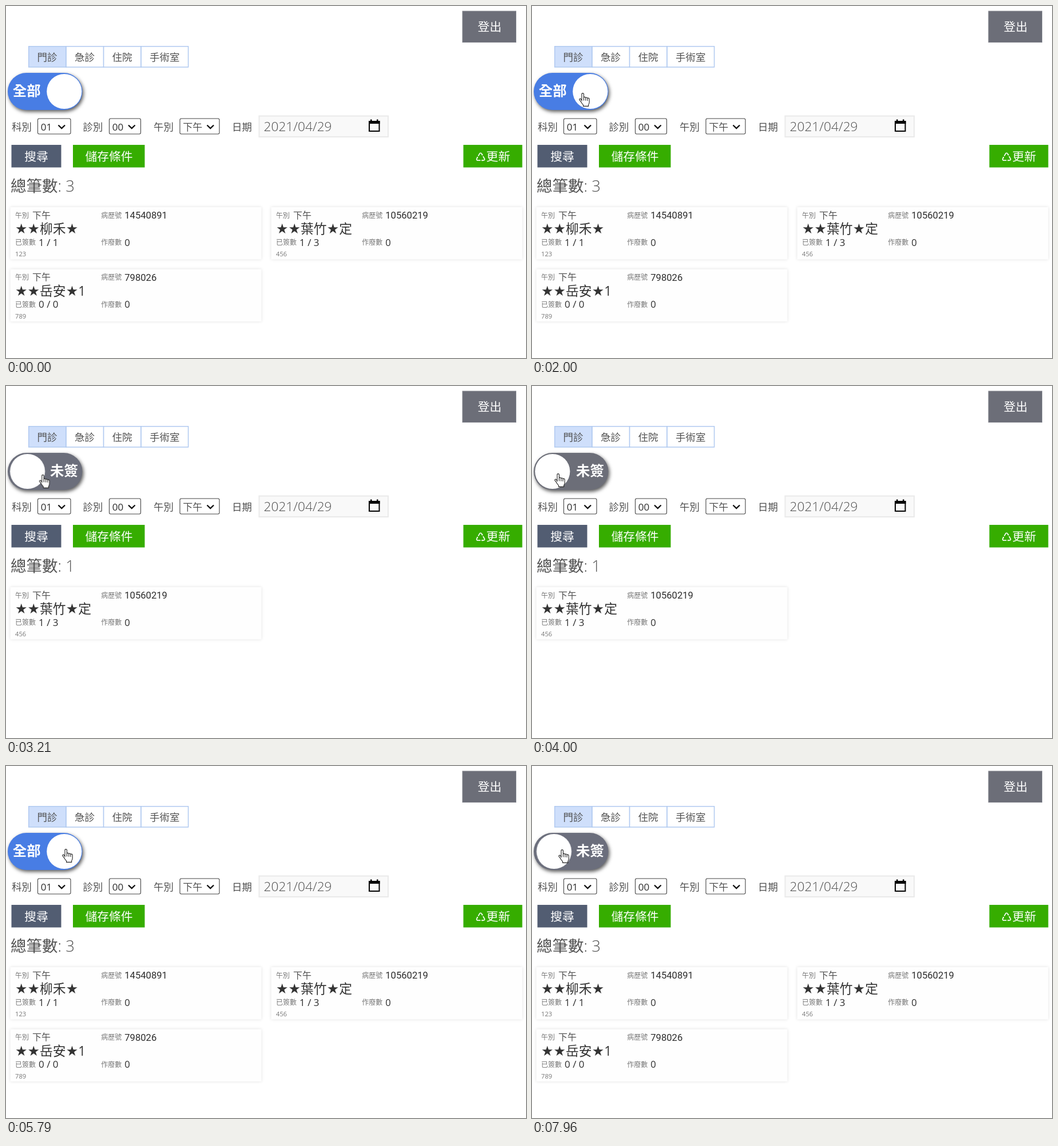
Animation, 909 px wide and 616 px high, one loop 8 s. Source, as an HTML page:

```html
<!DOCTYPE html>
<html lang="zh-Hant">
<head>
<meta charset="utf-8">
<title>門診清單</title>
<style>
html, body { margin: 0; width: 100%; height: 100%; overflow: hidden; background: #fff; }
svg { display: block; width: 909px; height: 616px; }
text { font-family: "Open Sans", "Noto Sans CJK TC", "Noto Sans CJK JP", sans-serif; font-weight: 300; fill: #505050; white-space: pre; }
.white { fill: #fff; }
.bold { font-weight: 700; }
.name { font-weight: 500; fill: #333; }
.dark { font-weight: 400; fill: #2c2c2c; }
.small { fill: #777; }
.num { font-family: Roboto, sans-serif; }
.sym { font-family: "DejaVu Sans", sans-serif; font-weight: 400; }
.card { fill: #fefefe; filter: drop-shadow(0 0 2.5px rgba(0, 0, 0, .12)); }
#track { fill: #487de4; filter: drop-shadow(2px 3px 3px rgba(0, 0, 0, .65)); }
</style>
</head>
<body>
<svg id="stage" viewBox="0 0 909 616">
  <g id="page"></g>
  <g id="toggle">
    <rect id="track" x="3" y="117" width="130.5" height="65" rx="32.5"/>
    <text class="white bold" x="11.8" y="157.3" font-size="24.4">全部</text>
    <text class="white bold" x="77" y="157.3" font-size="24.4">未簽</text>
    <circle id="knob" cx="101.8" cy="149.5" r="30.6" fill="#fff"/>
  </g>
  <g id="all"></g>
  <g id="unsigned"></g>
  <g id="cursor" stroke-linejoin="round" stroke-linecap="round">
    <path id="arrow" fill="#fff" stroke="#222" stroke-width="1.1" d="M.5.5V17.5L4.6 13.8 7.4 20.4 10 19.3 7.2 12.8H12.8Z"/>
    <path id="hand" fill="#fff" stroke="#222" stroke-width="1.1" d="M-2 14V2.2Q-2 .6-.3.6T1.5 2.2V8.5Q1.8 7 3.3 7.2T4.8 9Q5.2 7.7 6.6 8T8 9.8Q8.5 8.7 9.8 9.1T11.2 11V16.5Q11 19 9.7 20.5V23.4H.6V21.2Q-2.2 18.2-4 14.8L-6 12.2Q-6.5 10.8-5.2 10.3T-3.2 11.4L-2 13.2M1.5 8.5V13M4.8 9V13.2M8 9.8V13.4"/>
    <path id="beam" fill="none" stroke="#222" stroke-width="1.4" d="M-4.5-9H-1.5Q0-9 0-7.5 0-9 1.5-9H4.5M0-7.5V7.5M-4.5 9H-1.5Q0 9 0 7.5 0 9 1.5 9H4.5"/>
  </g>
</svg>
<script>
const LOOP = 8000;
const $ = id => document.getElementById(id);

const text = (x, y, size, str, cls = '') =>
  `<text x="${x}" y="${y}" font-size="${size}" class="${cls}">${str}</text>`;
const rect = (x, y, w, h, attrs) =>
  `<rect x="${x}" y="${y}" width="${w}" height="${h}" ${attrs}/>`;

const button = (x, y, w, h, fill, textX, baseline, label) =>
  rect(x, y, w, h, `fill="${fill}"`) + text(textX, baseline, 20.8, label, 'white');

const tab = (x, w, label, fill = '#fff') =>
  rect(x, 70.7, w, 36.2, `fill="${fill}" stroke="#b0c9f0" stroke-width="1.5"`) +
  text(x + 14.8, 95.5, 17.5, label);

const select = (x, w, value, cls = 'dark') =>
  rect(x, 197, w, 27, 'rx="2.5" fill="#fff" stroke="#444" stroke-width="1.1"') +
  text(x + 5.2, 217.8, 17, value, cls) +
  `<path d="M${x + w - 21.5} 208.5l5.8 5.6 5.8-5.6" fill="none" stroke="#111" stroke-width="2.3"/>`;

$('page').innerHTML = [
  rect(798, 9, 93.5, 54.5, 'fill="#6c6e78" stroke="#83858e"'),
  text(824.6, 43.7, 20.8, '登出', 'white'),
  tab(39.7, 65.4, '門診', '#cfdffb'),
  tab(105.1, 65.5, '急診'),
  tab(170.6, 65.5, '住院'),
  tab(236.1, 82.5, '手術室'),
  text(10, 217.8, 17.4, '科別'), select(55.5, 57.5, '01'),
  text(134.5, 217.8, 17.4, '診別'), select(180.5, 55, '00'),
  text(258, 217.8, 17.4, '午別'), select(304, 69, '下午', ''),
  text(395, 217.8, 17.4, '日期'),
  rect(442.5, 192.5, 225.5, 36.5, 'fill="#f9f9f9" stroke="#eaeaea" stroke-width="2"'),
  text(450.5, 219.3, 22.7, '2021/04/29'),
  '<path d="M635 202h17.5v17H635z" fill="none" stroke="#000" stroke-width="2"/>',
  '<path d="M634 201h19.5v5H634zM637 198.5h2.5v3H637zM648 198.5h2.5v3H648z"/>',
  button(9.5, 243, 87, 39.5, '#525d72', 32.3, 271.3, '搜尋'),
  button(117, 243, 125.5, 39.5, '#36ad00', 138.4, 271.3, '儲存條件'),
  button(799.5, 243, 103, 39.5, '#36ad00', 839.6, 271.3, '更新'),
  text(820.2, 271.5, 21, '♺', 'sym white'),
].join('');

const withStars = s => s.replace(/★+/g, '<tspan class="sym" font-size="24">$&</tspan>');

const card = (x, y, p) => `<g transform="translate(${x} ${y})">` +
  rect(7.5, 352, 439, 91.5, 'class="card"') +
  text(16, 370.5, 12, '午別', 'small') + text(46, 371.8, 16, '下午') +
  text(166.3, 370.5, 12, '病歷號', 'small') + text(207.3, 372, 16.6, p.id, 'num dark') +
  text(16, 398.3, 22.8, withStars(p.name), 'name') +
  text(16, 418, 12, '已簽數', 'small') + text(57, 419.5, 17, p.signed, 'dark') +
  text(166.3, 418, 12, '作廢數', 'small') + text(207.3, 419.5, 16.6, '0', 'dark') +
  text(16, 438.3, 11.2, p.note, 'dark small') + '</g>';

const patients = [
  { id: '14540891', name: '★★柳禾★', signed: '1 / 1', note: '123' },
  { id: '10560219', name: '★★葉竹★定', signed: '1 / 3', note: '456' },
  { id: '798026', name: '★★岳安★1', signed: '0 / 0', note: '789' },
];
const list = people => text(8, 325.3, 27.5, `總筆數: ${people.length}`) +
  people.map((p, i) => card(i % 2 * 456, (i >> 1) * 108.5, p)).join('');
$('all').innerHTML = list(patients);
$('unsigned').innerHTML = list([patients[1]]);

// steps: [ms, value, easing until the next step]
function play(el, prop, steps, fallback) {
  const last = steps[steps.length - 1];
  const full = last[0] < LOOP ? [...steps, [LOOP, last[1]]] : steps;
  el.animate(full.map(([ms, value, easing = fallback]) =>
    ({ offset: ms / LOOP, [prop]: value, easing })),
    { duration: LOOP, iterations: Infinity });
}
const HOLD = 'steps(1, end)';
const show = (id, steps) => play($(id), 'opacity', steps, HOLD);

// Toggle: each slide lasts 400 ms
const slides = [2895, 4670, 6880];
function slide(el, prop, on, off, cut) {
  const steps = [[0, on, HOLD]];
  slides.forEach((ms, i) => {
    const [from, to] = i % 2 ? [off, on] : [on, off];
    steps.push([ms, from, 'ease'], [ms + 400, to, HOLD]);
  });
  // the last slide is cut short by the end of the loop
  steps.push([7935, off, 'linear'], [LOOP, cut]);
  play(el, prop, steps, HOLD);
}
slide($('knob'), 'transform', 'translateX(0px)', 'translateX(-66px)', 'translateX(-59.4px)');
slide($('track'), 'fill', '#487de4', '#6c6e78', '#696f81');

show('all', [[0, 1], [2880, 0], [4670, 1], [6880, 0], [7920, 1]]);
show('unsigned', [[0, 0], [2880, 1], [4670, 0], [6880, 1], [7920, 0]]);

show('arrow', [[0, 0], [90, 1], [1340, 0], [2340, 1], [2790, 0]]);
show('beam', [[0, 0], [2790, 1], [3000, 0]]);
show('hand', [[0, 0], [1340, 1], [2340, 0], [3000, 1]]);

const at = (ms, x, y, easing) => [ms, `translate(${x}px, ${y}px)`, easing];
play($('cursor'), 'transform', [
  at(0, 175, 81, HOLD), at(130, 76, 190, HOLD), at(580, 76, 190),
  at(1000, 70, 153), at(1250, 89, 152, HOLD),
  at(2750, 89, 152), at(2880, 85, 157, HOLD),
  at(2960, 85, 157), at(3450, 46, 153, HOLD),
  at(4460, 46, 153), at(4660, 66, 161, HOLD),
  at(5670, 66, 161), at(5790, 105, 145, HOLD),
  at(6420, 105, 145), at(6840, 53, 146, HOLD),
], 'ease-in-out');
</script>
</body>
</html>
```
